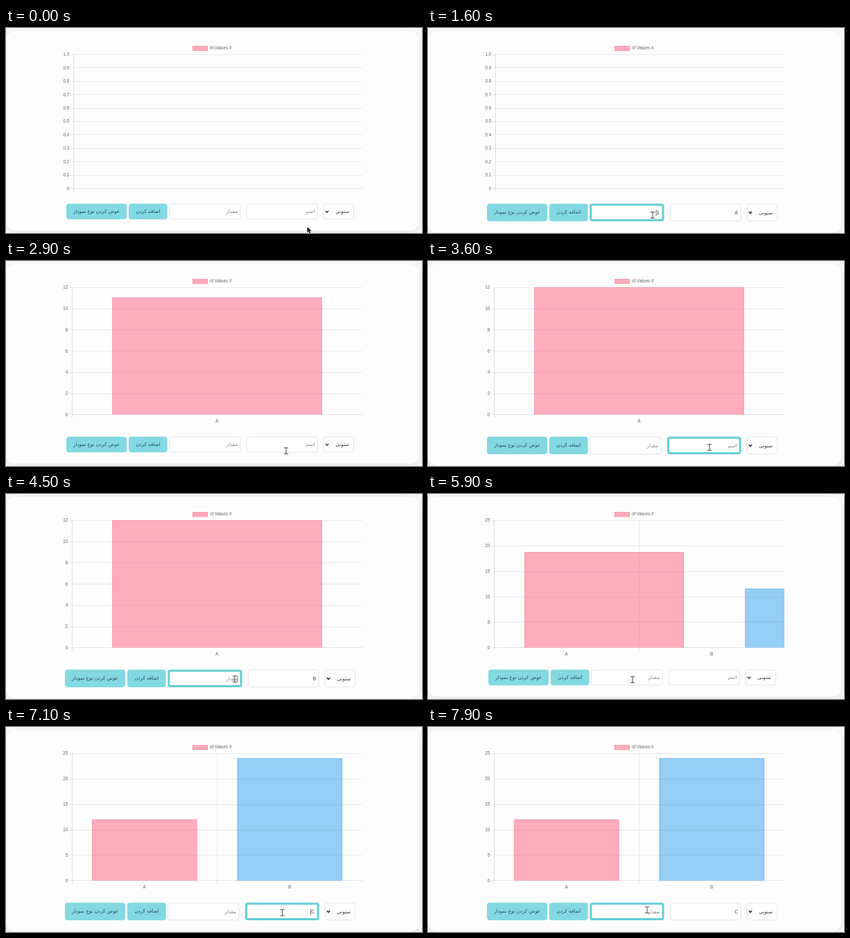
An HTML page with a canvas that plays this animation: 600x297 px, repeating every 8000 ms.

```html
<!DOCTYPE html>
<html lang="fa">
<head>
<meta charset="utf-8">
<style>
  html, body { margin: 0; width: 100%; height: 100%; overflow: hidden; background: #f6f6f9; }
  canvas { display: block; }
</style>
</head>
<body>
<canvas id="stage" width="600" height="297"></canvas>
<script>
const ctx = document.getElementById('stage').getContext('2d');
const LOOP = 8000;
const CHART_FONT = '6.4px "Liberation Sans", Arial, sans-serif';
const FORM_FONT = '7.1px "DejaVu Sans", sans-serif';
const PINK = '255,99,132', BLUE = '54,162,235';
const AREA = { top: 38.3, right: 514 };
const GROW = 740;

// Form history: focused field and its contents from each moment on.
const steps = [
  { at: 0, focus: '', name: '', value: '' },
  { at: 480, focus: 'name', name: '', value: '' },
  { at: 800, focus: 'name', name: 'A', value: '' },
  { at: 1280, focus: 'value', name: 'A', value: '' },
  { at: 1550, focus: 'value', name: 'A', value: '1' },
  { at: 1750, focus: 'value', name: 'A', value: '12' },
  { at: 2500, focus: '', name: '', value: '' },
  { at: 3150, focus: 'name', name: '', value: '' },
  { at: 3650, focus: 'name', name: 'B', value: '' },
  { at: 4350, focus: 'value', name: 'B', value: '' },
  { at: 4600, focus: 'value', name: 'B', value: '2' },
  { at: 4750, focus: 'value', name: 'B', value: '24' },
  { at: 5720, focus: '', name: '', value: '' },
  { at: 6480, focus: 'name', name: '', value: '' },
  { at: 6900, focus: 'name', name: 'C', value: '' },
  { at: 7480, focus: 'value', name: 'C', value: '' }
];

// Pointer path: time, x, y.
const path = [
  [0, 434.5, 288], [100, 434.5, 288], [430, 416, 270], [900, 416, 270],
  [1250, 324, 271], [1900, 324, 271], [2350, 206, 268], [2560, 206, 268],
  [2900, 404, 275], [3100, 406, 270], [3900, 406, 270], [4300, 330, 268],
  [5000, 330, 268], [5450, 208, 268], [5740, 208, 268], [5900, 295, 269],
  [6300, 391, 270], [6450, 402, 269], [7050, 402, 269], [7450, 326, 268],
  [7650, 325, 267], [7900, 316, 265], [8000, 316, 265]
];

const lerp = (a, b, p) => a + (b - a) * p;
const clamp = v => Math.max(0, Math.min(1, v));
const easeOutQuart = p => 1 - (1 - p) ** 4;

function pointerAt(t) {
  const i = path.findIndex(p => p[0] > t);
  const [t0, x0, y0] = path[i - 1], [t1, x1, y1] = path[i];
  const p = (t - t0) / (t1 - t0), s = p * p * (3 - 2 * p);
  return { x: lerp(x0, x1, s), y: lerp(y0, y1, s) };
}

function text(str, x, y, color, align, font = CHART_FONT) {
  ctx.font = font;
  ctx.fillStyle = color;
  ctx.textAlign = align;
  ctx.textBaseline = 'middle';
  ctx.direction = font === FORM_FONT ? 'rtl' : 'ltr';
  ctx.fillText(str, x, y);
}

function roundBox(x, y, w, h, r) {
  ctx.beginPath();
  ctx.roundRect(x, y, w, h, r);
}

function drawCard(bottom) {
  ctx.fillStyle = '#f6f6f9';
  ctx.fillRect(0, 0, 600, 297);
  ctx.save();
  ctx.shadowColor = 'rgba(0,0,0,.07)';
  ctx.shadowBlur = 6;
  ctx.shadowOffsetY = 2;
  ctx.fillStyle = '#fefdfe';
  roundBox(0, 4.5, 596, bottom - 4.5, 13);
  ctx.fill();
  ctx.restore();
}

function drawLegend() {
  ctx.fillStyle = `rgba(${PINK},.53)`;
  ctx.fillRect(269.3, 26.3, 21.4, 6.6);
  ctx.strokeStyle = `rgba(${PINK},.8)`;
  ctx.lineWidth = 0.6;
  ctx.strokeRect(269.3, 26.3, 21.4, 6.6);
  text('of Values #', 294, 29.6, '#666', 'left');
}

function drawGrid(left, bottom, max, step, decimals, labels) {
  const rows = Math.floor(max / step + 0.01);
  const span = bottom - AREA.top;
  for (let i = 0; i <= rows; i++) {
    const v = i * step, y = bottom - span * v / max;
    ctx.fillStyle = i ? 'rgba(30,30,60,.085)' : 'rgba(30,30,60,.12)';
    ctx.fillRect(left - 4, Math.floor(y), AREA.right - left + 4, 1);
    text(i ? v.toFixed(decimals) : '0', left - 5.7, y + 0.2, '#666', 'right');
  }
  ctx.fillStyle = 'rgba(30,30,60,.13)';
  ctx.fillRect(left, AREA.top, 1, span + 4);
  const slot = (AREA.right - left) / (labels.length || 1);
  labels.forEach((label, i) => {
    ctx.fillStyle = 'rgba(30,30,60,.1)';
    if (i) ctx.fillRect(Math.floor(left + slot * i), AREA.top, 1, span + 4);
    text(label, left + slot * (i + 0.5), 232.6, '#666', 'center');
  });
}

function drawBar(center, width, height, bottom, rgb) {
  const x = center - width / 2, y = bottom - height;
  ctx.fillStyle = `rgba(${rgb},.52)`;
  ctx.fillRect(x, y, width, height);
  ctx.strokeStyle = `rgba(${rgb},.9)`;
  ctx.lineWidth = 0.6;
  ctx.beginPath();
  ctx.moveTo(x, bottom);
  ctx.lineTo(x, y);
  ctx.lineTo(x + width, y);
  ctx.lineTo(x + width, bottom);
  ctx.stroke();
}

function drawChart(t) {
  const firstAt = 2555, secondAt = 5789;
  drawLegend();
  if (t < firstAt) {
    drawGrid(97, 232.6, 1, 0.1, 1, []);
    return;
  }
  const left = 95, bottom = 222.8, full = bottom - AREA.top;
  const span = AREA.right - left, wide = span * 0.72;
  const second = t >= secondAt;
  const p = easeOutQuart(clamp((t - (second ? secondAt : firstAt)) / GROW));
  if (second) drawGrid(left, bottom, 25, 5, 0, ['A', 'B']);
  else drawGrid(left, bottom, 12, 2, 0, ['A']);

  ctx.save();
  ctx.beginPath();
  ctx.rect(left, AREA.top - 0.3, span, full + 0.3);
  ctx.clip();
  if (second) {
    const width = lerp(wide, wide / 2, p);
    drawBar(left + span * lerp(0.5, 0.25, p), width, full * lerp(1, 12 / 25, p), bottom, PINK);
    drawBar(left + span * lerp(1.5, 0.75, p), width, full * p * 24 / 25, bottom, BLUE);
  } else {
    drawBar(left + span / 2, wide, full * p, bottom, PINK);
  }
  ctx.restore();
}

function drawButton(x, w, h, label) {
  ctx.fillStyle = '#82d9e2';
  roundBox(x, 254.6, w, h, 4);
  ctx.fill();
  text(label, x + w / 2, 254.8 + h / 2, '#234b58', 'center', FORM_FONT);
}

function drawField(x, w, h, content, hint, focused, caret) {
  const border = focused ? 3 : 0.7, inset = border / 2;
  const right = x + w - (focused ? 6.5 : 4.5), y = 255.1 + h / 2;
  ctx.fillStyle = '#fff';
  ctx.strokeStyle = focused ? '#62ced7' : '#d9d9de';
  ctx.lineWidth = border;
  roundBox(x + inset, 254.6 + inset, w - border, h - border, focused ? 2 : 3.5);
  ctx.fill();
  ctx.stroke();
  text(content || hint, right, y, content ? '#444' : '#808085', 'right', FORM_FONT);
  if (focused && caret) {
    const shift = content ? ctx.measureText(content).width + 0.5 : 0;
    ctx.fillStyle = '#333';
    ctx.fillRect(right - shift - 0.3, y - 4.6, 0.7, 9);
  }
}

function drawSelect(x, h) {
  drawField(x, 44, h, '', '', false, false);
  text('ستونی', x + 37, 255 + h / 2, '#333', 'right', FORM_FONT);
  const y = 254.6 + h / 2;
  ctx.strokeStyle = '#111';
  ctx.lineWidth = 1.3;
  ctx.beginPath();
  ctx.moveTo(x + 2.8, y - 1);
  ctx.lineTo(x + 5, y + 1.2);
  ctx.lineTo(x + 7.2, y - 1);
  ctx.stroke();
}

function drawForm(t, state) {
  const { focus, name, value } = state;
  const h = focus ? 25.4 : 22.6, out = focus ? 2 : 0;
  const caret = (t - state.at) % 740 < 370;
  const onName = focus === 'name', onValue = focus === 'value';
  drawButton(87 - out, 87, h, 'عوض کردن نوع نمودار');
  drawButton(177 - out, 55.6, h, 'اضافه کردن');
  drawField(235.3 - out, 103.2 + (onValue ? 4 : 0), h, value, 'مقدار', onValue, caret);
  drawField(347 + (onValue ? 2 : -out), 102.6 + (onName ? 4 : 0), h, name, 'اسم', onName, caret);
  drawSelect(458 + out, h);
}

function drawArrow(x, y) {
  ctx.beginPath();
  [[0, 0], [0, 8.6], [2, 6.8], [3.4, 9.8], [4.9, 9.1], [3.6, 6.3], [6.2, 6.1]]
    .forEach(([dx, dy]) => ctx.lineTo(x + dx, y + dy));
  ctx.closePath();
  ctx.fillStyle = '#111';
  ctx.strokeStyle = '#fff';
  ctx.lineWidth = 0.8;
  ctx.stroke();
  ctx.fill();
}

function drawBeam(x, y) {
  ctx.strokeStyle = '#444';
  ctx.lineWidth = 1;
  ctx.beginPath();
  for (const s of [-1, 1]) {
    ctx.moveTo(x - 3, y + 4.3 * s);
    ctx.lineTo(x + 3, y + 4.3 * s);
  }
  ctx.moveTo(x, y - 4.3);
  ctx.lineTo(x, y + 4.3);
  ctx.stroke();
}

function drawPointer(t) {
  const { x, y } = pointerAt(t);
  const overField = y > 255 && y < 278 && ((x > 235 && x < 339) || (x > 347 && x < 450));
  if (overField) drawBeam(x, y);
  else drawArrow(x, y);
}

function render(now) {
  const t = now % LOOP;
  const state = steps.filter(s => s.at <= t).pop();
  drawCard(state.focus ? 296.2 : 293.4);
  drawChart(t);
  drawForm(t, state);
  drawPointer(t);
}

const start = performance.now();
function tick() {
  render(Math.max(0, performance.now() - start));
  requestAnimationFrame(tick);
}
tick();
</script>
</body>
</html>
```
